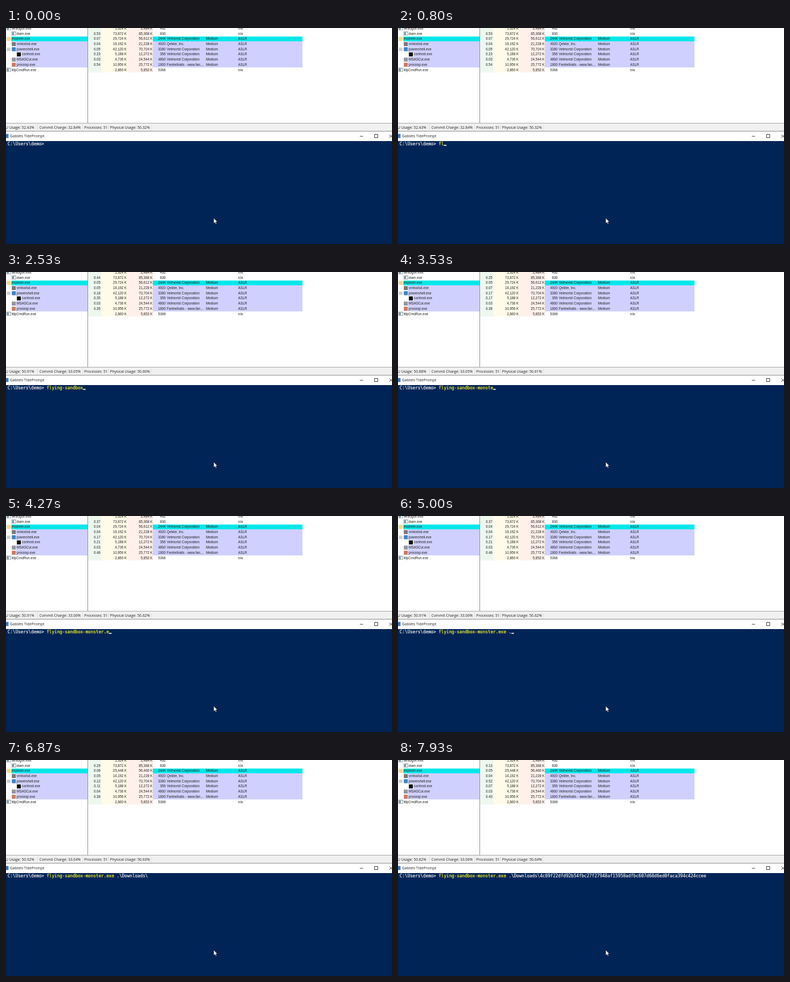
Animation of 720 by 405 pixels, one loop 8000 ms. Source, as an HTML page with a canvas:

```html
<!DOCTYPE html>
<html lang="en">
<head>
<meta charset="utf-8">
<title>Process list and console</title>
<style>
html, body { margin: 0; width: 100%; height: 100%; overflow: hidden; background: #012456; }
canvas { display: block; width: 720px; height: 405px; }
</style>
</head>
<body>
<canvas id="stage"></canvas>
<script>
const W = 720, H = 405, LOOP = 8000;
const canvas = document.getElementById('stage');
const ctx = canvas.getContext('2d');
const dpr = window.devicePixelRatio || 1;
canvas.width = W * dpr;
canvas.height = H * dpr;

const LIST_FONT = '6.35px "Liberation Sans", Arial, sans-serif';
const UI_FONT = '6.9px "Open Sans", "Noto Sans", sans-serif';
const CONSOLE_FONT = '8.06px "DejaVu Sans Mono", monospace';
const LAVENDER = '#d0d0ff', CYAN = '#00e8ea', NAVY = '#012456';
const ROW = 9.71, INDENT = 9.5;
const CORP = 'Velmorist Corporation';

// name, indent, icon, private, working set, pid, company, integrity, aslr, fill
const rows = [
  ['winlogon.exe', 0, 'app', '1,324 K', '2,484 K', '492', '', '', 'n/a'],
  ['dwm.exe', 1, 'app', '73,872 K', '85,368 K', '836', '', '', 'n/a'],
  ['explorer.exe', 0, '#f3d98a', '', '', '2444', CORP, 'Medium', 'ASLR', CYAN],
  ['vmtoolsd.exe', 1, '#77777c', '16,192 K', '21,228 K', '4920', 'Qelder, Inc.', 'Medium', 'ASLR', LAVENDER],
  ['powershell.exe', 1, '#3c87c4', '42,120 K', '70,704 K', '3280', CORP, 'Medium', 'ASLR', LAVENDER],
  ['conhost.exe', 2, '#101010', '5,188 K', '12,272 K', '356', CORP, 'Medium', 'ASLR', LAVENDER],
  ['MSASCui.exe', 1, '#95959c', '4,736 K', '24,544 K', '4800', CORP, 'Medium', 'ASLR', LAVENDER],
  ['procexp.exe', 1, '#cf7a62', '10,956 K', '25,772 K', '1800', 'Fantrelloids - www.fan...', 'Medium', 'ASLR', LAVENDER],
  ['MpCmdRun.exe', 0, 'app', '2,860 K', '5,852 K', '5368', '', '', 'n/a']
];

// Readings: start time, CPU per row from the second on, then usage, commit, physical
const readings = [
  [0, '0.53 0.07 0.04 0.05 0.23 0.03 0.54', '52.43 32.84 50.32'],
  [1130, '0.32 0.05 0.04 0.15 0.17 0.03 0.36 <', '50.57 33.05 50.61'],
  [2130, '0.44 0.05 0.05 0.18 0.35 0.03 0.35', '50.91 33.05 50.60'],
  [3130, '0.25 0.05 0.07 0.17 0.17 0.03 0.38', '50.88 33.05 50.61'],
  [4130, '0.37 0.04 0.04 0.17 0.21 0.03 0.46', '50.91 33.06 50.62'],
  [5130, '0.31 0.05 0.04 0.15 0.16 0.03 0.39', '50.90 33.05 50.62'],
  [6130, '0.29 0.08 0.05 0.12 0.11 0.04 0.38', '50.92 33.04 50.63'],
  [7130, '0.13 0.05 0.04 0.52 0.07 0.03 0.40', '50.82 33.06 50.64']
];

const PROMPT = 'C:\\Users\\demo> ';
const COMMAND = 'flying-sandbox-monster.exe';
const LINE = COMMAND + ' .\\Downloads\\' +
  '4c69f22dfd92b54fbc27f27948af15958adfbc607d68d6ed0faca394c424ccee';
// Typing pace: time, characters on the line
const pace = [[600, 0], [1700, 11], [2450, 14], [3500, 21], [4950, 28], [5600, 31]];
const TAB = 5800, SLASH = 6150, PASTE = 7270, BLINK = 530;

function rect(x, y, w, h, color) {
  ctx.fillStyle = color;
  ctx.fillRect(x, y, w, h);
}

function text(str, x, y, color = '#222', align = 'left') {
  ctx.fillStyle = color;
  ctx.textAlign = align;
  ctx.fillText(str, x, y);
}

function line(color, width, ...pts) {
  ctx.strokeStyle = color;
  ctx.lineWidth = width;
  ctx.beginPath();
  for (let i = 0; i < pts.length; i += 4) {
    ctx.moveTo(pts[i], pts[i + 1]);
    ctx.lineTo(pts[i + 2], pts[i + 3]);
  }
  ctx.stroke();
}

function icon(kind, x, y) {
  if (kind !== 'app') {
    rect(x + 0.3, y - 3.4, 7.5, 7.5, kind);
    return;
  }
  rect(x, y - 3.6, 8.2, 7.2, '#747a80');
  rect(x + 0.7, y - 2.6, 6.8, 5.5, '#f6f8fa');
  rect(x + 1.4, y - 1.9, 2.6, 4.1, '#4e8790');
}

function drawList(now, t) {
  rect(0, 0, W, 179, '#fff');
  rect(153, 0, 25, 83.3, '#edf7ee');
  rect(178, 0, 48, 83.3, '#fffbe8');
  rect(226, 0, 48, 83.3, '#fff0ea');
  const cpu = now[1].split(' ');
  const shrunk = t >= 6130;
  ctx.font = LIST_FONT;
  rows.forEach((row, i) => {
    const [name, indent, mark, priv, work, pid, company, level, aslr, fill] = row;
    const y = 0.6 + i * ROW, base = y + 2.3;
    const nameX = 10.5 + indent * INDENT;
    if (fill) {
      // Rows meet on whole pixels; the name's fill begins after its icon
      const top = Math.round(y - 4.4), bottom = Math.round(y - 4.4 + ROW);
      rect(Math.round(nameX - 0.6), top, 152 - Math.round(nameX - 0.6), bottom - top, fill);
      rect(274, top, 279, bottom - top, fill);
    }
    icon(mark, 1 + indent * INDENT, y);
    text(name, nameX, base);
    const load = i ? cpu[i - 1] || '' : '';
    text(load === '<' ? '< 0.01' : load, 176, base, '#222', 'right');
    const isShell = name === 'explorer.exe';
    text(isShell ? (shrunk ? '29,448 K' : '29,724 K') : priv, 225, base, '#222', 'right');
    text(isShell ? (shrunk ? '56,460 K' : '56,612 K') : work, 273.2, base, '#222', 'right');
    text(pid, 297.8, base, '#222', 'right');
    text(company, 300, base);
    text(level, 373, base);
    text(aslr, 433, base);
  });
  // Tree toggle
  rect(2, 37, 6, 6, '#8c8c98');
  rect(2.6, 37.6, 4.8, 4.8, '#fff');
  rect(3.5, 39.6, 3, 0.8, '#334');
  rect(152, 0, 1, 178, '#8e8e8e');
}

function drawStatus(now) {
  const [usage, commit, physical] = now[2].split(' ');
  rect(0, 178, W, 15, '#f0f0f0');
  rect(0, 178, W, 1, '#a4a4a4');
  for (const x of [58.5, 142.6, 190.5, 269.8]) rect(x, 181, 0.7, 11, '#d2d2d2');
  ctx.font = UI_FONT;
  text(`CPU Usage: ${usage}%`, -9.4, 189);
  text(`Commit Charge: ${commit}%`, 62.3, 189);
  text('Processes: 51', 146, 189);
  text(`Physical Usage: ${physical}%`, 194, 189);
}

function drawTitleBar() {
  rect(0, 193, W, 19, '#fff');
  rect(0, 193, W, 1, '#85898d');
  rect(-2, 198.7, 6.6, 7.6, '#3c78b8');
  ctx.font = UI_FONT;
  text('Gablets TidePrompt', 7.6, 205.4);
  line('#222', 0.9, 660, 203, 666, 203, 715, 199.8, 721, 205.8, 715, 205.8, 721, 199.8);
  ctx.strokeRect(687.4, 199.6, 6, 6);
}

function typed(t) {
  if (t >= PASTE) return LINE.length;
  if (t >= SLASH) return 39;
  if (t >= TAB) return 38;
  if (t < pace[0][0]) return 0;
  for (let i = 1; i < pace.length; i++) {
    const [t0, n0] = pace[i - 1], [t1, n1] = pace[i];
    if (t < t1) return Math.floor(n0 + (n1 - n0) * (t - t0) / (t1 - t0));
  }
  return pace[pace.length - 1][1];
}

function cursorOn(t) {
  if (t < 270) return false;
  if (t < SLASH) return true;
  const idle = t - (t >= PASTE ? PASTE : SLASH);
  return idle % (2 * BLINK) < BLINK;
}

function drawConsole(t) {
  rect(0, 212, W, H - 212, NAVY);
  ctx.font = CONSOLE_FONT;
  const cell = ctx.measureText('0').width;
  const left = 3.1, base = 219.6, count = typed(t);
  const put = (str, col, color) => {
    text(str, left + col * cell, base, color);
    // A hairline thickens the small glyphs
    ctx.strokeStyle = color;
    ctx.lineWidth = 0.22;
    ctx.strokeText(str, left + col * cell, base);
  };
  put(PROMPT, 0, '#f0f0ee');
  put(LINE.slice(0, Math.min(count, COMMAND.length)), PROMPT.length, '#fcf52c');
  put(LINE.slice(COMMAND.length, Math.max(count, COMMAND.length)),
    PROMPT.length + COMMAND.length, '#eeedeb');
  if (cursorOn(t)) {
    rect(left + (PROMPT.length + count) * cell, 219.1, cell, 1.8, '#f0efdf');
  }
}

function drawPointer() {
  ctx.beginPath();
  [[0, 0], [0, 10], [2.3, 7.9], [3.9, 11.2], [5.4, 10.5], [3.9, 7.3], [6.9, 7.2]]
    .forEach(([x, y]) => ctx.lineTo(387.4 + x, 356.4 + y));
  ctx.closePath();
  ctx.fillStyle = '#fff';
  ctx.fill();
  ctx.strokeStyle = '#101520';
  ctx.lineWidth = 0.6;
  ctx.stroke();
}

function draw(t) {
  const now = readings.filter(r => r[0] <= t).pop();
  ctx.setTransform(dpr, 0, 0, dpr, 0, 0);
  drawList(now, t);
  drawStatus(now);
  drawTitleBar();
  drawConsole(t);
  drawPointer();
}

const start = performance.now();
function tick() {
  draw((performance.now() - start) % LOOP);
  requestAnimationFrame(tick);
}
tick();
</script>
</body>
</html>
```
